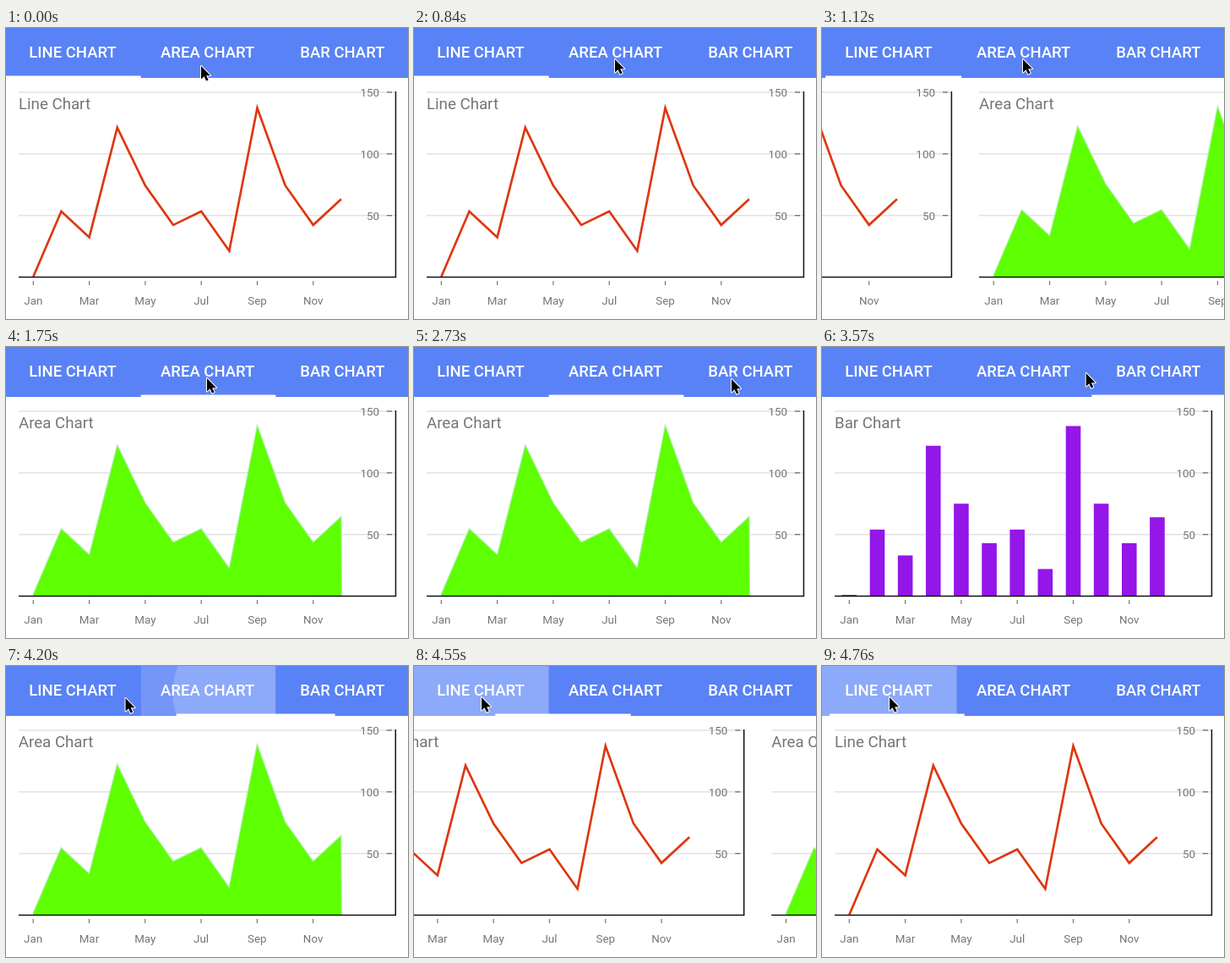
An HTML page with a canvas that plays this animation: 476x344 px, repeating every 4830 ms.

```html
<!DOCTYPE html>
<html lang="en">
<head>
<meta charset="utf-8">
<title>Chart tabs</title>
<style>
  html, body { margin: 0; width: 100%; height: 100%; overflow: hidden; background: #fff; }
  canvas { display: block; }
</style>
</head>
<body>
<canvas id="stage" width="476" height="344"></canvas>
<script>
const ctx = document.getElementById('stage').getContext('2d');
const LOOP = 4830, PAGE = 479, TAB = PAGE / 3, HEADER = 59, BASE = 294.5;
const values = [1, 54, 33, 122, 75, 43, 54, 22, 138, 75, 43, 64];
const months = ['Jan', 'Mar', 'May', 'Jul', 'Sep', 'Nov'];
const tabs = ['LINE CHART', 'AREA CHART', 'BAR CHART'];

// One entry per tab change; lead and trail time the two edges of the indicator.
const moves = [
  { from: 0, to: 1, page: 910, lead: 1070, trail: 1077, ripple: [1125, 1340], x: 238 },
  { from: 1, to: 2, page: 2735, lead: 2915, trail: 2945, ripple: [2940, 3160], x: 376 },
  { from: 2, to: 1, page: 3713, lead: 3960, trail: 4012, ripple: [4000, 4420], x: 286 },
  { from: 1, to: 0, page: 4258, lead: 4398, trail: 4399, ripple: [4330, 5200], x: 80 }
];

// time, x, y of the pointer tip
const pointer = [
  [0, 231, 45], [280, 238, 37], [2100, 238, 37], [2590, 376, 38], [3220, 376, 38],
  [3570, 313, 31], [3660, 286, 32], [3780, 286, 32], [4200, 142, 38], [4340, 80, 37], [LOOP, 80, 37]
];

const clamp = v => Math.min(1, Math.max(0, v));
const mix = (a, b, k) => a + (b - a) * k;

// cubic-bezier(.35, 0, .25, 1) over 500 ms
function ease(elapsed) {
  const x = clamp(elapsed / 500);
  let lo = 0, hi = 1;
  for (let i = 0; i < 24; i++) {
    const s = (lo + hi) / 2, r = 1 - s;
    if (1.05 * s * r * r + .75 * s * s * r + s ** 3 < x) lo = s; else hi = s;
  }
  return lo * lo * (3 - 2 * lo);
}

function position(t, key) {
  let p = 0;
  for (const m of moves) if (t >= m[key(m)]) p = mix(m.from, m.to, ease(t - m[key(m)]));
  return p;
}

function pointerAt(t) {
  const i = pointer.findIndex((p, n) => n && t <= p[0]);
  const a = pointer[i - 1], b = pointer[i], k = (t - a[0]) / (b[0] - a[0]);
  return [mix(a[1], b[1], k), mix(a[2], b[2], k)];
}

function rect(x, y, w, h, color) {
  ctx.fillStyle = color;
  ctx.fillRect(x, y, w, h);
}

function text(str, x, y, font, color, align) {
  ctx.font = font + ' Roboto, sans-serif';
  ctx.fillStyle = color;
  ctx.textAlign = align;
  ctx.fillText(str, x, y);
}

const px = i => 32.3 + 33.15 * i;
const py = v => BASE - 1.457 * v;

function trace(dy) {
  ctx.beginPath();
  values.forEach((v, i) => ctx.lineTo(px(i), py(v) + dy));
}

const plots = [
  () => {
    trace(1);
    ctx.strokeStyle = '#dd3810';
    ctx.lineWidth = 2.7;
    ctx.stroke();
  },
  () => {
    trace(-.8);
    ctx.lineTo(px(11) + .5, BASE);
    ctx.lineTo(px(0), BASE);
    ctx.closePath();
    ctx.fillStyle = '#5eff00';
    ctx.fill();
    trace(-1);
    ctx.lineTo(px(11) + .5, BASE);
    ctx.strokeStyle = '#a9efa0';
    ctx.lineWidth = 1.2;
    ctx.stroke();
  },
  () => values.forEach((v, i) => rect(px(i) - 8.8, py(v), 17.6, BASE - py(v), '#9416e8'))
];

function chart(index, x) {
  ctx.save();
  ctx.translate(x, 0);
  for (const v of [50, 100, 150]) rect(15, py(v) - .75, 446, 1.5, '#e2e2e2');
  plots[index]();
  text(['Line', 'Area', 'Bar'][index] + ' Chart', 15, 95.5, '18.7px', '#757575', 'left');
  for (const v of [50, 100, 150]) {
    text(v, 442, py(v) + 5, '13.4px', '#757575', 'right');
    rect(451, py(v) - .6, 6, 1.2, '#666');
  }
  months.forEach((name, i) => {
    rect(px(2 * i) - .6, 299, 1.2, 5, '#777');
    text(name, px(2 * i), 327, '13.4px', '#757575', 'center');
  });
  rect(15, BASE - .75, 447, 1.5, '#111');
  rect(460.7, 75, 1.5, 220, '#111');
  ctx.restore();
}

function ripple(t, m) {
  const [start, end] = m.ripple;
  if (t < start || t > end) return;
  const age = t - start;
  const fade = clamp((end - t) / 140);
  ctx.save();
  ctx.beginPath();
  ctx.rect(m.to * TAB, 0, TAB, HEADER);
  ctx.clip();
  rect(m.to * TAB, 0, TAB, HEADER, `rgba(255,255,255,${.16 * clamp(age / 120) * fade})`);
  ctx.beginPath();
  ctx.arc(m.x, 32, age * .44, 0, 7);
  ctx.fillStyle = `rgba(255,255,255,${.18 * fade})`;
  ctx.fill();
  ctx.restore();
}

function header(t) {
  rect(0, 0, 476, HEADER, '#5982f6');
  moves.forEach(m => ripple(t, m));
  tabs.forEach((name, i) => text(name, (i + .5) * TAB - .8, 34.7, '500 18.5px', '#fff', 'center'));
  const left = position(t, m => m.to > m.from ? 'trail' : 'lead') * TAB;
  const right = (position(t, m => m.to > m.from ? 'lead' : 'trail') + 1) * TAB;
  rect(left, 56.5, right - left, 2.5, '#fff');
}

const arrow = new Path2D('M0 0V15.5L3.6 12.2 6 17.6 8.6 16.5 6.2 11.2H11Z');

function cursor(t) {
  ctx.save();
  ctx.translate(...pointerAt(t));
  ctx.lineJoin = 'round';
  ctx.strokeStyle = '#fff';
  ctx.lineWidth = 2;
  ctx.stroke(arrow);
  ctx.fillStyle = '#000';
  ctx.fill(arrow);
  ctx.restore();
}

function draw(now) {
  const t = now % LOOP;
  rect(0, 0, 476, 344, '#fff');
  const scroll = position(t, () => 'page') * PAGE;
  for (let i = 0; i < 3; i++) {
    const x = i * PAGE - scroll;
    if (Math.abs(x) < PAGE) chart(i, x);
  }
  header(t);
  cursor(t);
  requestAnimationFrame(draw);
}
requestAnimationFrame(draw);
</script>
</body>
</html>
```
